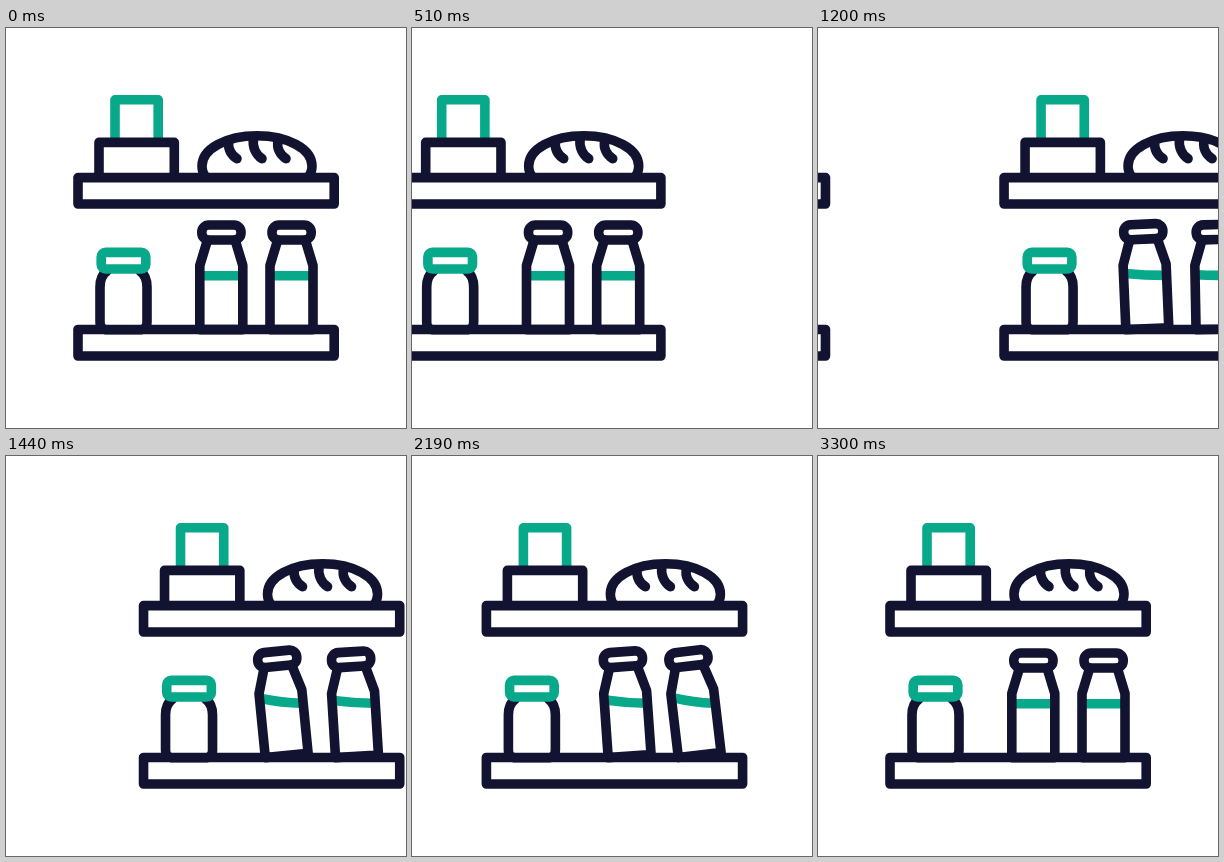
An HTML page with a canvas for the animation above (5.33 s loop, 400 by 400 pixels).

```html
<!DOCTYPE html>
<html lang="en">
<head>
<meta charset="utf-8">
<title>Shelves</title>
<style>
  html, body { margin: 0; width: 100%; height: 100%; overflow: hidden; background: #fff; }
  canvas { display: block; width: 100vw; height: 100vh; }
</style>
</head>
<body>
<canvas id="stage"></canvas>
<script>
const LOOP = 5330, STEP = 30, LAST = 3300;
const SLIDE = 2400, GAP = 434.8;
const DARK = '#121331', GREEN = '#08a88a';

const canvas = document.getElementById('stage');
const ctx = canvas.getContext('2d');

const clamp = v => Math.min(1, Math.max(0, v));
const smooth = v => { v = clamp(v); return v * v * (3 - 2 * v); };

// Cubic bezier easing with handles (x1, 0) and (x2, 1)
function ease(x, x1, x2) {
  if (x <= 0 || x >= 1) return clamp(x);
  let lo = 0, hi = 1;
  for (let i = 0; i < 30; i++) {
    const u = (lo + hi) / 2, v = 1 - u;
    if (3 * u * v * v * x1 + 3 * u * u * v * x2 + u * u * u < x) lo = u;
    else hi = u;
  }
  return smooth(lo);
}

// Rises from start to peak, then falls back to zero at end
const swing = (t, start, peak, end) =>
  t < peak ? smooth((t - start) / (peak - start)) : smooth((end - t) / (end - peak));

function line(d, color = DARK) {
  ctx.strokeStyle = color;
  ctx.stroke(new Path2D(d));
}

function frame(x, y, w, h, r, color = DARK) {
  ctx.strokeStyle = color;
  ctx.beginPath();
  ctx.roundRect(x, y, w, h, r);
  ctx.stroke();
}

function boxes() {
  line('M109 112V71.8H152.2V112', GREEN);
  line('M93 149V114.4H168.3V149');
}

function bread() {
  line('M200 149C197 146 196 142 196 138C196 121 220 107.8 251 107.8' +
       'C282 107.8 306 121 306 138C306 142 305 146 302 149');
  line('M222.5 113C222 121 225 127 231 130.7');
  line('M247.5 110C246 119 250 127 256 130.7');
  line('M272 113C270.5 120 274 127 280 130.7');
}

function jar() {
  line('M101 243Q94 248 94 259V293.8Q94 301.8 102 301.8H133Q141 301.8 141 293.8V259Q141 248 134 243');
  frame(95.2, 224.4, 44.6, 16.6, 4.5, GREEN);
}

function bottle(x, tilt) {
  ctx.save();
  ctx.translate(x, 301.6);
  ctx.rotate(-tilt * Math.PI / 180);
  // The liquid sloshes against the tilt
  const level = -53.9 - tilt * 0.17;
  const rise = 20 * Math.tan(tilt * 2.15 * Math.PI / 180);
  const sag = tilt * 0.35;
  line(`M1.5 ${level - rise}Q21.5 ${level + sag} 41.5 ${level + rise}`, GREEN);
  line('M7.7 -89.6L0 -64.1V0H43V-64.1L35.3 -89.6');
  frame(2, -104.6, 39.2, 15, 7);
  ctx.restore();
}

function scene(dx, tiltA, tiltB) {
  ctx.save();
  ctx.translate(dx, 0);
  boxes();
  bread();
  frame(72, 149.6, 256.2, 26.4, 0);
  frame(72, 301.5, 256.2, 26.5, 0);
  jar();
  bottle(193.8, tiltA);
  bottle(264, tiltB);
  ctx.restore();
}

function draw(t) {
  const wide = Math.round(canvas.clientWidth * devicePixelRatio);
  const tall = Math.round(canvas.clientHeight * devicePixelRatio);
  if (canvas.width !== wide || canvas.height !== tall) {
    canvas.width = wide;
    canvas.height = tall;
  }
  ctx.setTransform(wide / 400, 0, 0, tall / 400, 0, 0);
  ctx.fillStyle = '#fff';
  ctx.fillRect(0, 0, 400, 400);
  ctx.lineWidth = 9.6;
  ctx.lineCap = ctx.lineJoin = 'round';

  const shift = GAP * ease(t / SLIDE, 0.333, 0.297);
  const tiltA = 7 * swing(t, 900, 1650, 2850);
  const tiltB = 7.4 * swing(t, 960, 1950, 3240);
  if (shift < 340) scene(-shift, 0, 0);
  if (shift > 90) scene(GAP - shift, tiltA, tiltB);
}

const start = performance.now();
function tick() {
  const t = (performance.now() - start) % LOOP;
  draw(Math.min(LAST, Math.floor(t / STEP) * STEP));
  requestAnimationFrame(tick);
}
tick();
</script>
</body>
</html>
```
